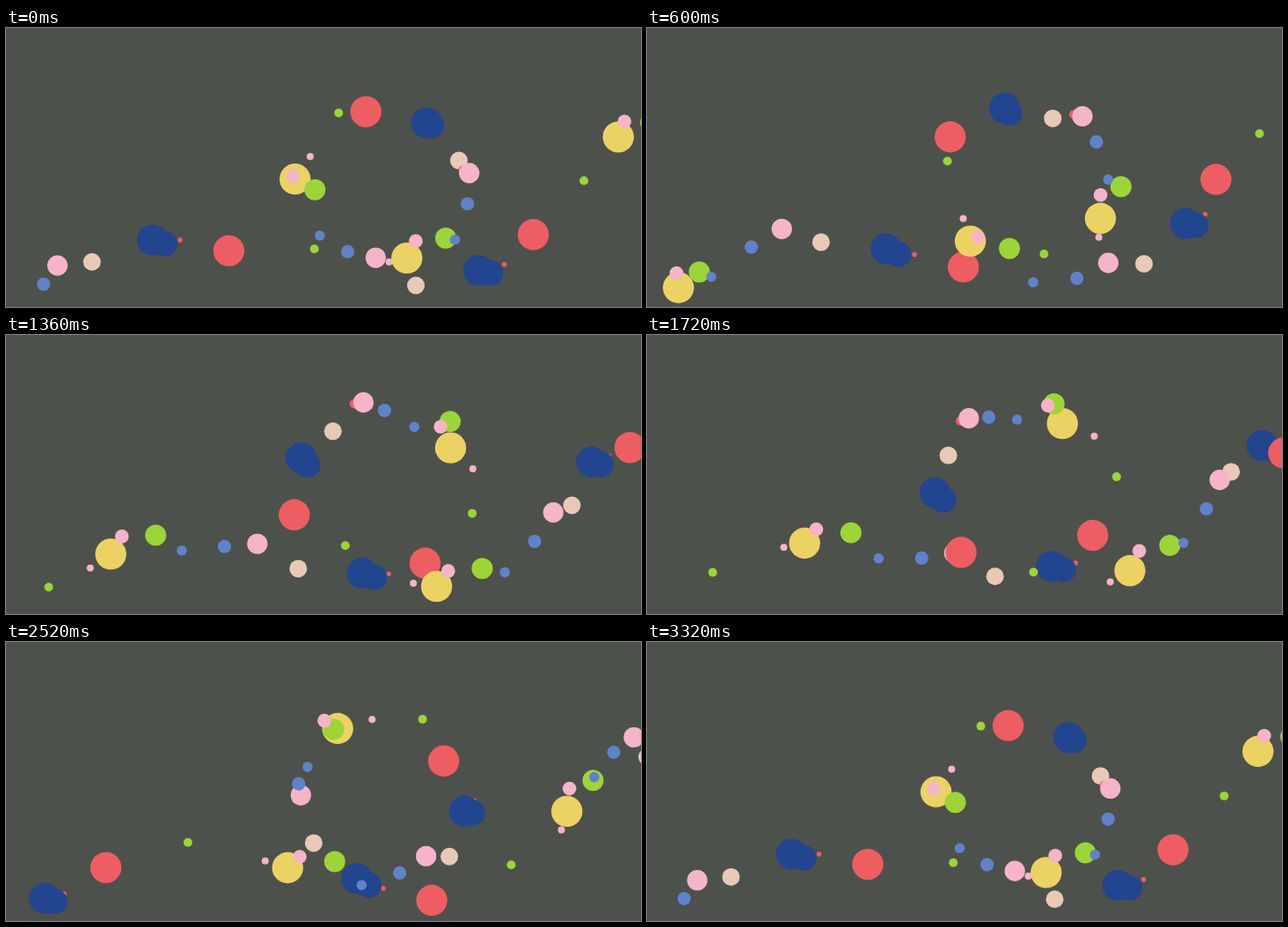
An HTML page for the animation above (3360 ms loop, 722x317 px).

```html
<!DOCTYPE html>
<html lang="en">
<head>
<meta charset="utf-8">
<title>Dots on a loop</title>
<style>
  html, body { margin: 0; width: 100%; height: 100%; overflow: hidden; background: #4d514b; }
  svg { display: block; width: 722px; height: 317px; }
</style>
</head>
<body>
<svg id="stage" viewBox="0 0 722 317"></svg>
<script>
const LOOP = 3360, STEP = 40;
const PERIOD = 10000 / 3, COPIES = 3, LIFE = PERIOD * COPIES;

// Key points of the one path every dot follows: in, round the loop, out
const path = [
  { t: 1735, x: 28.5, y: 303 },
  { t: 2150, x: 54, y: 286.5 },
  { t: 2400, x: 94, y: 264 },
  { t: 2870, x: 172, y: 244.5 },
  { t: 3670, x: 313, y: 264.5 },
  { t: 4250, x: 413, y: 275 },
  { t: 4773, x: 485, y: 254 },
  { t: 5300, x: 515.5, y: 200 },
  { t: 5900, x: 494.5, y: 131 },
  { t: 6650, x: 411, y: 95 },
  { t: 7270, x: 344.5, y: 124 },
  { t: 7860, x: 322, y: 184.5 },
  { t: 8386, x: 357, y: 247 },
  { t: 8826, x: 420, y: 285.5 },
  { t: 9186, x: 484, y: 293.5 },
  { t: 9630, x: 555.5, y: 269 },
  { t: 10270, x: 625, y: 207 },
  { t: 10999, x: 673, y: 138 },
  { t: 11340, x: 708, y: 128 },
  { t: 11735, x: 724, y: 134 }
];
const START = path[0].t;

const red = "#ee5d62", yellow = "#ecd263", navy = "#21458f", pink = "#f6b4c9",
      green = "#9bd537", beige = "#e9c9b5", blue = "#5f82cb";

// Back to front; each dot follows the path shifted by dx, dy and delayed
const dots = [
  { fill: beige, r: 10, dx: 8.5, dy: -0.5, delay: 962 },
  { fill: red, r: 5.2, dx: 4.5, dy: -20, delay: 1206 },
  { fill: pink, r: 11.6, dx: 11, dy: -20.5, delay: 1240 },
  { fill: blue, r: 7.6, dx: 11, dy: -9.5, delay: 1450 },
  { fill: red, r: 2.8, dx: 16.5, dy: -3, delay: 408 },
  { fill: navy, r: 17.6, dx: 5.5, dy: -5, delay: 528 },
  { fill: navy, r: 14.4, dx: 14.7, dy: 0, delay: 499 },
  { fill: red, r: 17.7, dx: 0, dy: 0, delay: 0 },
  { fill: green, r: 5, dx: 19.4, dy: -16, delay: -440 },
  { fill: pink, r: 4, dx: 20.5, dy: -9, delay: -930 },
  { fill: yellow, r: 17.7, dx: 7.2, dy: -8, delay: -1150 },
  { fill: green, r: 12, dx: 23.5, dy: -20.5, delay: -1360 },
  { fill: pink, r: 7.8, dx: 3, dy: -23, delay: -1252 },
  { fill: blue, r: 5.8, dx: 11, dy: 1, delay: -1608 }
];

const mod = (a, n) => ((a % n) + n) % n;

// Speed along one axis at a key point; the path starts and ends at rest
function speed(i, axis) {
  const a = path[i - 1], b = path[i], c = path[i + 1];
  if (!a || !c) return 0;
  const before = b.t - a.t, after = c.t - b.t;
  return ((b[axis] - a[axis]) / before * after + (c[axis] - b[axis]) / after * before) / (before + after);
}

// Smooth Hermite curve through the key points
function position(time, axis) {
  const i = path.findLastIndex((p, n) => p.t <= time && n < path.length - 1);
  const a = path[i], b = path[i + 1], span = b.t - a.t;
  const u = (time - a.t) / span, v = 1 - u;
  return a[axis] + (b[axis] - a[axis]) * u * u * (3 - 2 * u) +
    span * u * v * (v * speed(i, axis) - u * speed(i + 1, axis));
}

const stage = document.getElementById("stage");
const circles = dots.flatMap(dot =>
  Array.from({ length: COPIES }, (_, copy) => {
    const node = document.createElementNS("http://www.w3.org/2000/svg", "circle");
    node.setAttribute("fill", dot.fill);
    node.setAttribute("r", dot.r);
    stage.append(node);
    return { ...dot, node, delay: dot.delay + copy * PERIOD };
  }));

function draw(now) {
  for (const { node, dx, dy, delay } of circles) {
    const time = START + mod(now - delay - START, LIFE);
    node.setAttribute("cx", (position(time, "x") + dx).toFixed(2));
    node.setAttribute("cy", (position(time, "y") + dy).toFixed(2));
  }
}

const begin = performance.now();
function tick() {
  const time = (performance.now() - begin) % LOOP;
  draw(Math.floor(time / STEP) * STEP);
  requestAnimationFrame(tick);
}
tick();
</script>
</body>
</html>
```
